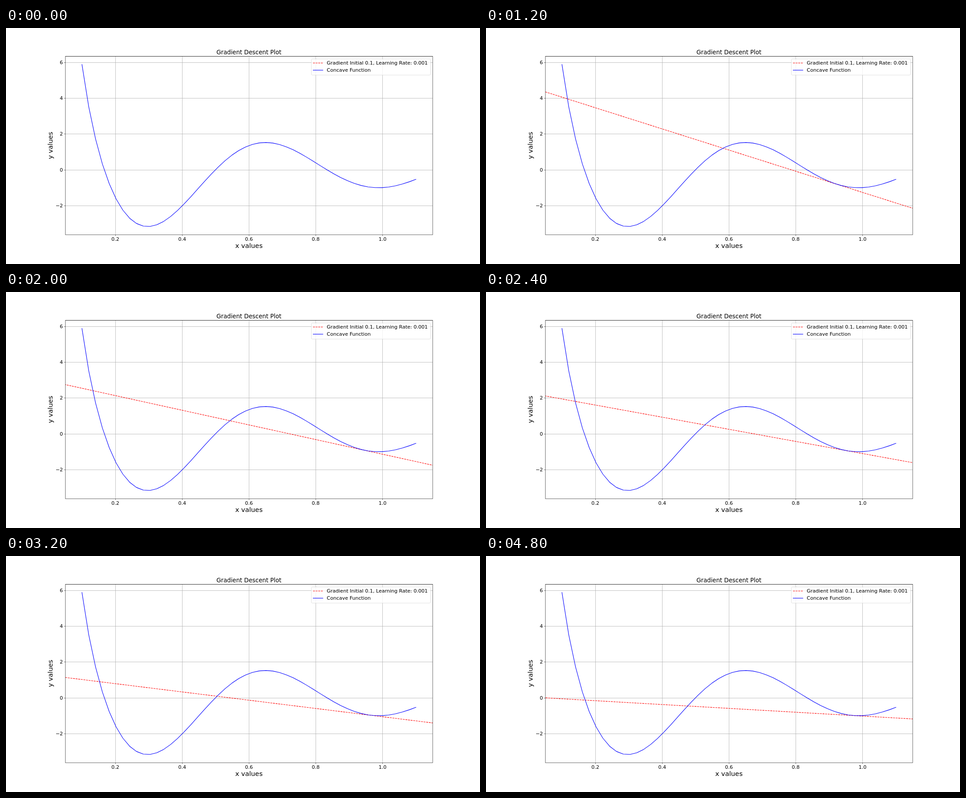
These frames come from a looping animation (1058 by 529 pixels, 5 s). An HTML page with a canvas:

```html
<!DOCTYPE html>
<html lang="en">
<head>
<meta charset="utf-8">
<title>Gradient Descent Plot</title>
<style>
html, body { margin: 0; width: 100%; height: 100%; overflow: hidden; background: #fff; }
canvas { display: block; }
</style>
</head>
<body>
<canvas id="stage" width="1058" height="529"></canvas>
<script>
const ctx = document.getElementById('stage').getContext('2d');
const W = 1058, H = 529, PT = 52.9 / 72;
const LEFT = W * 0.125, RIGHT = W * 0.9, TOP = H * 0.12, BOTTOM = H * 0.875;
const THIN = 0.8 * PT, LINE = 1.5 * PT;
const DASH = [3.7 * LINE, 1.6 * LINE];
const W3 = 3 * Math.PI;

const f = x => Math.cos(W3 * x) / x;
const slope = x => -W3 * Math.sin(W3 * x) / x - Math.cos(W3 * x) / x ** 2;

const curve = Array.from({ length: 50 }, (_, i) => {
  const x = 0.1 + i / 49;
  return [x, f(x)];
});
const ys = curve.map(p => p[1]);
const lo = Math.min(...ys), hi = Math.max(...ys), margin = (hi - lo) * 0.05;
const scaleX = (RIGHT - LEFT) / 1.1;
const scaleY = (BOTTOM - TOP) / (hi - lo + 2 * margin);
const px = x => LEFT + (x - 0.05) * scaleX;
const py = y => TOP + (hi + margin - y) * scaleY;
const snap = v => Math.round(v) + 0.5;

// Positions visited by the descent, one per step
const steps = [0.03502];
while (steps.length < 24) {
  const x = steps[steps.length - 1];
  steps.push(x - 0.001 * slope(x));
}

function stroke(points, color, width, dash = []) {
  ctx.beginPath();
  points.forEach(p => ctx.lineTo(...p));
  ctx.strokeStyle = color;
  ctx.lineWidth = width;
  ctx.setLineDash(dash);
  ctx.stroke();
}

function text(str, x, y, size, align = 'center') {
  ctx.font = `${size * PT}px "DejaVu Sans", sans-serif`;
  ctx.textAlign = align;
  ctx.fillStyle = '#000';
  ctx.fillText(str, x, y);
}

function drawAxes() {
  const l = snap(LEFT), r = snap(RIGHT), t = snap(TOP), b = snap(BOTTOM), tick = 3.5 * PT;
  for (const v of [0.2, 0.4, 0.6, 0.8, 1]) {
    const x = snap(px(v));
    stroke([[x, b], [x, b + tick]], '#000', THIN);
    text(v.toFixed(1), px(v), 477, 15);
  }
  for (const v of [-2, 0, 2, 4, 6]) {
    const y = snap(py(v));
    stroke([[l, y], [l - tick, y]], '#000', THIN);
    text(String(v).replace('-', '\u2212'), LEFT - 7 * PT, Math.round(py(v) + 4), 15, 'right');
  }
  stroke([[l, t], [r, t], [r, b], [l, b], [l, t], [r, t]], '#000', THIN);
  const mid = (LEFT + RIGHT) / 2;
  text('Gradient Descent Plot', mid, 59, 18);
  text('x values', mid, 493, 20);
  ctx.save();
  ctx.translate(104, (TOP + BOTTOM) / 2);
  ctx.rotate(-Math.PI / 2);
  text('y values', 0, 0, 20);
  ctx.restore();
}

function drawGrid() {
  for (const v of [0.2, 0.4, 0.6, 0.8, 1]) {
    const x = snap(px(v));
    stroke([[x, TOP], [x, BOTTOM]], '#b0b0b0', 0.8);
  }
  for (const v of [-2, 0, 2, 4, 6]) {
    const y = snap(py(v));
    stroke([[LEFT, y], [RIGHT, y]], '#b0b0b0', 0.8);
  }
}

function drawTangent(x) {
  const m = -slope(x) * scaleY / scaleX;
  const x0 = px(x), y0 = py(f(x));
  // Dashes are counted from where the line enters the stage
  const start = Math.max(-1, x0 + (-1 - y0) / m);
  const at = u => [u, y0 + m * (u - x0)];
  const end = Math.min(W + 1, x0 + (H + 1 - y0) / m);
  stroke([at(start), at(end)], '#f00', LINE, DASH);
}

function drawLegend() {
  ctx.beginPath();
  ctx.roundRect(681.5, 69.5, 266, 36, 2.2);
  ctx.fillStyle = 'rgba(255,255,255,0.8)';
  ctx.fill();
  ctx.strokeStyle = 'rgba(204,204,204,0.8)';
  ctx.lineWidth = PT;
  ctx.setLineDash([]);
  ctx.stroke();
  stroke([[685.4, 78.5], [707.5, 78.5]], '#f00', LINE, DASH);
  stroke([[685, 94.5], [708, 94.5]], '#00f', LINE);
  text('Gradient Initial 0.1, Learning Rate: 0.001', 716, 82, 15, 'left');
  text('Concave Function', 716, 98, 15, 'left');
}

function draw(now) {
  const step = Math.floor(now % 5000 / 200);
  ctx.fillStyle = '#fff';
  ctx.fillRect(0, 0, W, H);
  drawGrid();
  ctx.save();
  ctx.beginPath();
  ctx.rect(LEFT, TOP, RIGHT - LEFT, BOTTOM - TOP);
  ctx.clip();
  ctx.lineJoin = 'round';
  if (step > 0) drawTangent(steps[step - 1]);
  ctx.lineCap = 'square';
  stroke(curve.map(([x, y]) => [px(x), py(y)]), '#00f', LINE);
  ctx.restore();
  drawAxes();
  drawLegend();
}

const begin = performance.now();
function loop() {
  draw(performance.now() - begin);
  requestAnimationFrame(loop);
}
loop();
</script>
</body>
</html>
```
